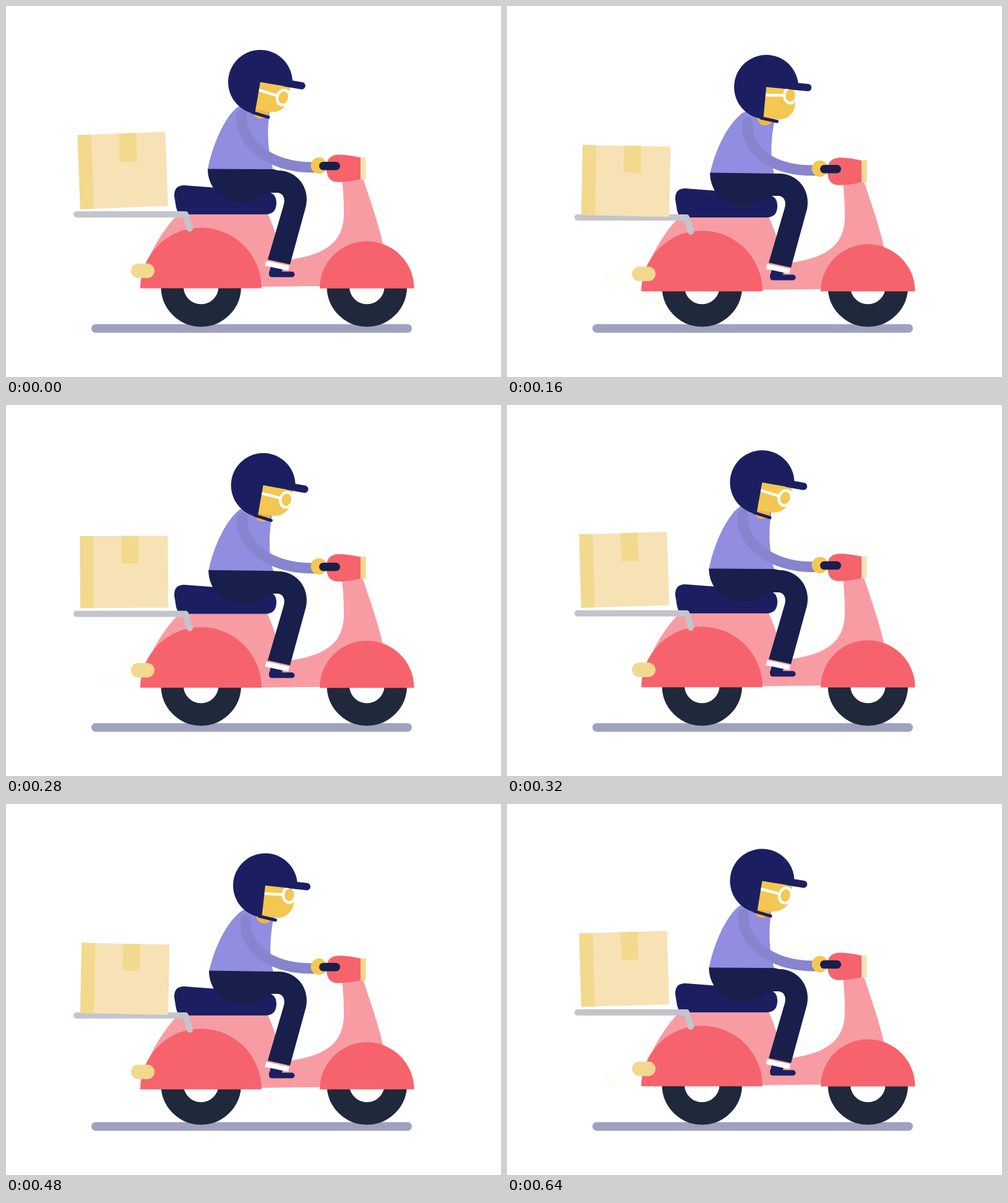
Write an HTML page that moves like this. It is 800 by 600 pixels and loops after 0.68 s.

```html
<!DOCTYPE html>
<html lang="en">
<head>
<meta charset="utf-8">
<title>Scooter delivery</title>
<style>
  html, body { margin: 0; width: 100%; height: 100%; overflow: hidden; background: #fff; }
  svg { display: block; width: 100vw; height: 100vh; }
  .navy { fill: #1b1f62; }
  .dark { fill: #181f4a; }
  .pink { fill: #f89ca3; }
  .red { fill: #f7636c; }
  .sand { fill: #f2d98e; }
  .skin { fill: #f3c752; }
  .line { fill: none; stroke-linecap: round; stroke-linejoin: round; }
  .tyre { fill: #fff; stroke: #20293b; stroke-width: 36.5; }
</style>
</head>
<body>
<svg viewBox="0 0 800 600">
  <rect x="138" y="514.5" width="518" height="14" rx="7" fill="#9fa2bf"/>
  <g id="puff" fill="#fffdfa">
    <circle cx="-4" cy="0" r="13"/><circle cx="6" cy="1" r="10"/>
  </g>
  <circle class="tyre" cx="315.2" cy="454" r="46.5"/>
  <circle class="tyre" cx="583.3" cy="454" r="46.5"/>

  <g data-move="body">
    <path class="pink" d="M217 450C226 410 250 360 290 325L415 320C440 365 440 400 455 411C505 403 546 390 546 335C546 315 545 300 543 278L576 276C590 318 602 352 610 388L600 430L505 453L412 454Z"/>
  </g>

  <g data-move="shell">
    <path class="red" d="M217 456.5A98 98 0 0 1 413 456.5Z"/>
    <path class="red" d="M507 456.7A76.3 76.3 0 0 1 659.6 456.7Z"/>
    <rect class="sand" x="202" y="416.5" width="38" height="23.5" rx="11.7"/>
    <path class="navy" d="M288 290L420 300Q437 302 437 318Q437 337 419 337H288Q277 337 275 326L272 308Q271 290 288 290Z"/>
    <path class="line" d="M114 337H290L297 360" stroke="#c4c4cc" stroke-width="10"/>
    <path class="red" d="M518 262C518 250 522 242 535 240.5C550 240 562 243 573 245V280C562 283 545 285.5 533 284.5C522 283 518 274 518 262Z"/>
    <rect id="lamp" x="573" y="244.5" width="8.6" height="36"/>
  </g>

  <g id="box">
    <rect x="-71" y="-120" width="142" height="120" fill="#f6e2b5"/>
    <rect class="sand" x="-71" y="-120" width="22" height="120"/>
    <rect class="sand" x="-4" y="-120" width="27.5" height="46"/>
  </g>

  <g data-move="body">
    <path class="navy" d="M428 421L447 426L445 432H425Z"/>
    <path class="navy" d="M425 429.5H462A4.5 4.5 0 0 1 462 438.5H430Q425 438.5 425 433Z"/>
  </g>
  <path id="torso" fill="#918de0"/>
  <path id="leg" class="dark"/>
  <g data-move="body">
    <path fill="#fff" d="M420.5 412L458 420L456 428L418.5 420Z"/>
  </g>

  <circle id="neck" r="13.5" fill="#f1b540"/>
  <path id="arm" class="line" stroke="#8785cd" stroke-width="17"/>
  <g data-move="body">
    <circle class="skin" cx="505.8" cy="258" r="13.2"/>
    <rect class="dark" x="506" y="252" width="34" height="13.5" rx="6.7"/>
  </g>

  <g data-move="head">
    <path id="face" class="skin" d="M-2 -8H49V19A26 26 0 0 1 23 45H-2Z"/>
  </g>
  <g id="glasses" class="line" stroke="#fff" stroke-width="4.4">
    <path d="M-3 0H31"/>
    <ellipse cx="41" rx="9.9" ry="12.4"/>
  </g>
  <g data-move="head">
    <path class="navy" d="M0 0V52A52 52 0 1 1 52 0Z"/>
    <path class="line" d="M40 -5.5H67" stroke="#1b1f62" stroke-width="11.8"/>
    <path class="line" d="M-4 50.5L22.5 53.8" stroke="#1b1f62" stroke-width="5"/>
  </g>
</svg>
<script>
const LOOP = 680, STEP = 40;
const $ = id => document.getElementById(id);
const set = (id, name, value) => $(id).setAttribute(name, value);
const move = (name, value) => document.querySelectorAll(`[data-move=${name}]`)
  .forEach(el => el.setAttribute('transform', value));

// Rest and fully dipped outlines with matching commands
const torso = [
  'M326 264C334 224 352 184 371 166C378 159 388 160 395 160L426 170C422 200 422 232 432 265Z',
  'M328.4 271.6C338 232 357 193 381 175C386 171 396 172 404 172L434 184C429 209 424 245 432 272.5Z'];
const leg = [
  'M326 263.5L432 264L440 266C470 266 491 293 485 323L459 418L423 410L449 321C452 310 447 302 438 302C428 302 420 302 412 308C400 316 390 316.5 380 316.5C350 316.5 326 295 326 263.5Z',
  'M328.4 270.5L432 272.3L440 272C470 272 491 299 485 329L459 424L423 416L449 327C452 316 447 308 438 308C428 308 420 308 414 316C402 325 392 325.5 382 325.5C352 325.5 328.4 302 328.4 270.5Z'];

function blend([a, b], k) {
  const end = b.match(/[\d.]+/g);
  let i = 0;
  return a.replace(/[\d.]+/g, n => (+n + (end[i++] - n) * k).toFixed(2));
}

// Eased 0..1 swing through alternating rest and dip times; equal neighbours hold
function swing(t, keys) {
  for (let i = 1; i < keys.length; i++) {
    const [t0, v0] = keys[i - 1], [t1, v1] = keys[i];
    if (t <= t1) return v0 + (v1 - v0) * (1 - Math.cos(Math.PI * (t - t0) / (t1 - t0))) / 2;
  }
  return 0;
}
const riderKeys = [[0, 0], [40, 0], [200, 1], [360, 0], [520, 1], [680, 0]];
const nodKeys = [[0, 0], [160, 1], [320, 0], [360, 0], [520, 1], [680, 0]];

function draw(t) {
  const bump = (1 - Math.cos(2 * Math.PI * t / 320)) / 2;
  const dip = swing(t, riderKeys);
  const nod = swing(t, nodKeys);

  move('shell', `translate(0 ${4.9 * bump})`);
  move('body', `translate(0 ${5.9 * dip})`);
  set('lamp', 'fill', bump < 0.1 ? '#f6e2b5' : '#f2d98e');
  set('box', 'transform',
    `translate(191 ${326 + 13.5 * bump}) rotate(${-2.2 + 4 * dip}) scale(1 ${1 - 0.063 * dip})`);

  set('torso', 'd', blend(torso, dip));
  set('leg', 'd', blend(leg, dip));
  const sx = 381 + 8 * nod, sy = 176 + 11.5 * dip + 1.8 * nod, hy = 261 + 5.9 * dip;
  set('arm', 'd', `M${sx} ${sy}C${sx - 5} ${sy + 39} 420 ${hy + 1} 498 ${hy}`);

  const x = 411 + 9.4 * dip, y = 123 + 15 * dip - 4.7 * nod;
  set('neck', 'cx', 411.5 + 7 * dip);
  set('neck', 'cy', 168.5 + 13 * dip);
  move('head', `translate(${x} ${y}) rotate(${9.8 + 2.5 * dip - 6.6 * nod})`);
  set('face', 'transform', `translate(0 ${5.6 * nod})`);
  set('glasses', 'transform', `translate(${x - 2} ${y + 13}) rotate(${17.2 - 16.5 * nod})`);

  const u = t % 400;
  set('puff', 'visibility', u >= 120 && u < 320 ? 'visible' : 'hidden');
  set('puff', 'transform', `translate(171 445.5) scale(${1 - Math.max(0, u - 160) * 0.0015})`);
}

let start;
function tick(now) {
  start ??= now;
  draw(Math.floor((now - start) % LOOP / STEP) * STEP);
  requestAnimationFrame(tick);
}
draw(0);
requestAnimationFrame(tick);
</script>
</body>
</html>
```
